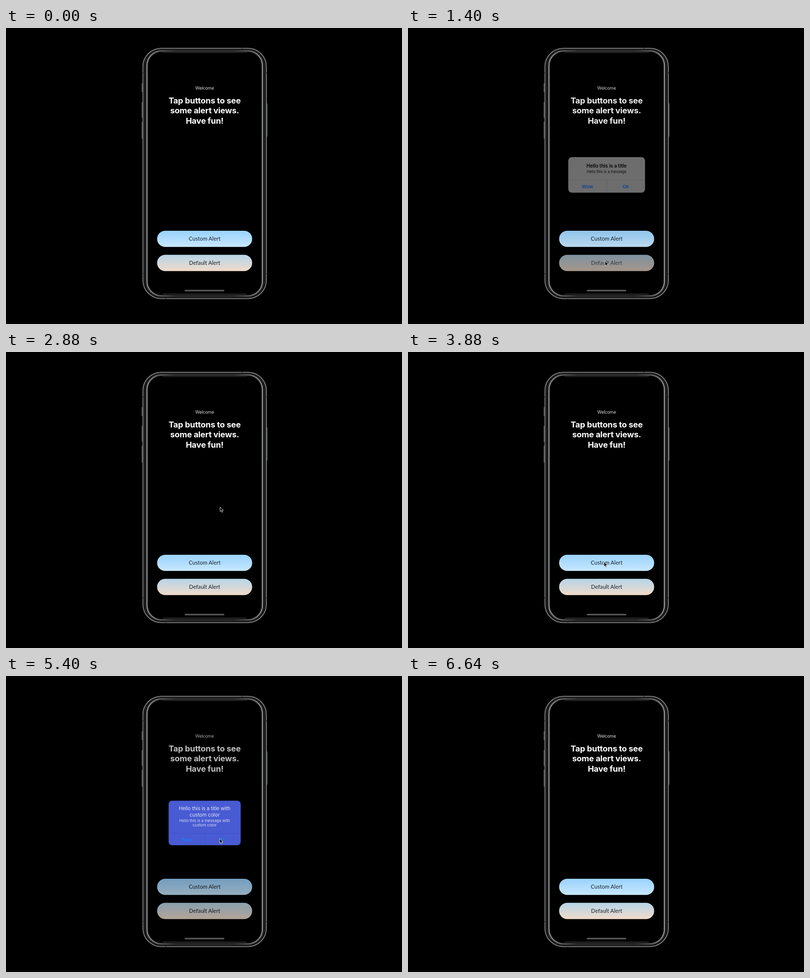
Animation of 800x600 px, one loop 6680 ms. Source, as an HTML page:

```html
<!DOCTYPE html>
<html lang="en">
<head>
<meta charset="utf-8">
<title>Alert views</title>
<style>
  html, body { margin: 0; width: 100%; height: 100%; overflow: hidden; background: #000; }
  svg { display: block; width: 800px; height: 600px; }
  text { text-anchor: middle; font-family: Inter, "Open Sans", sans-serif; }
  .heading { font-size: 16.6px; font-weight: 700; letter-spacing: -.2px; fill: #fff; }
  .label { font: 11px Lato, sans-serif; letter-spacing: .05px; fill: #17222b; }
  .action { font-size: 9px; font-weight: 600; fill: #1f7bf2; }
  .title { font-size: 9.2px; font-weight: 600; letter-spacing: -.08px; fill: #0c0c0c; }
  .message { font-size: 7px; letter-spacing: 0; fill: #151515; }
  .light { font-size: 10px; font-weight: 400; letter-spacing: -.05px; fill: #e4e6f6; }
  .small { font-size: 7.9px; letter-spacing: -.03px; fill: #d8dcf4; }
</style>
</head>
<body>
<svg viewBox="0 0 800 600">
  <defs>
    <linearGradient id="sky" x2="0" y2="1">
      <stop stop-color="#99d2fd"/><stop offset="1" stop-color="#c8e8ff"/>
    </linearGradient>
    <linearGradient id="dawn" x2="0" y2="1">
      <stop stop-color="#b7d5e8"/><stop offset=".5" stop-color="#d3d7d9"/><stop offset="1" stop-color="#f1dbc9"/>
    </linearGradient>
    <linearGradient id="rim">
      <stop stop-color="#a4a6a7"/><stop offset=".12" stop-color="#6a6a6a"/><stop offset=".25" stop-color="#2a2a2a"/>
      <stop offset=".75" stop-color="#2a2a2a"/><stop offset=".88" stop-color="#6a6a6a"/><stop offset="1" stop-color="#a4a6a7"/>
    </linearGradient>
    <linearGradient id="shine" x2="0" y2="1">
      <stop stop-color="#3c3c3c"/><stop offset="1" stop-color="#000"/>
    </linearGradient>
  </defs>

  <g id="phone" fill="none">
    <path d="M274.8 112V130M274.8 150V182M274.8 190V224M527.4 153V220" stroke="#5c5f60" stroke-width="1.6"/>
    <rect x="276.7" y="41.2" width="249.2" height="507.2" rx="37" fill="#0b0b0b" stroke="#77797a" stroke-width="2"/>
    <rect x="280.5" y="44.6" width="241.6" height="500.4" rx="34" stroke="#2c2d2d" stroke-width="1.6"/>
    <rect x="285" y="46.6" width="232.8" height="496.4" rx="30" fill="#000" stroke="#242424" stroke-width="4.4"/>
    <path d="M312 46.5H491L484 52H319Z" fill="url(#shine)"/>
    <path d="M319 538H484L491 542.4H312Z" fill="#1d1d1d"/>
    <rect x="284.6" y="46.4" width="233.6" height="496.8" rx="30" stroke="url(#rim)" stroke-width="1.8"/>
    <path d="M275.5 91H279M523.5 91H527M275.5 498H279M523.5 498H527M477 40V43M323 546.5V549.5" stroke="#2c2c2c" stroke-width="1.5"/>
  </g>

  <text x="401.3" y="125" font-size="8.8" letter-spacing="-.1" fill="#dcdcdc">Welcome</text>
  <text class="heading" x="401.3" y="152.6">Tap buttons to see</text>
  <text class="heading" x="401.3" y="173.2">some alert views.</text>
  <text class="heading" x="401.3" y="193.8">Have fun!</text>

  <g id="customButton">
    <rect x="305.3" y="410.9" width="192" height="32.9" rx="16.4" fill="url(#sky)"/>
    <text class="label" x="401.3" y="431">Custom Alert</text>
  </g>
  <g id="defaultButton">
    <rect x="305.3" y="459.8" width="192" height="32.9" rx="16.4" fill="url(#dawn)"/>
    <text class="label" x="401.3" y="480">Default Alert</text>
  </g>

  <rect id="dim" x="292" y="100" width="220" height="400"/>
  <rect x="361" y="530.8" width="80" height="3" rx="1.5" fill="#5b5b5b"/>

  <g id="defaultAlert">
    <rect x="328.5" y="264" width="145.6" height="67.6" rx="7" fill="#bdbdbd"/>
    <path d="M328.5 307.5H474M401.5 307.5V331.6" stroke="#a3a3a3" stroke-width=".7"/>
    <text class="title" x="401.2" y="283.6">Hello this is a title</text>
    <text class="message" x="401.2" y="294.5">Hello this is a message</text>
    <text class="action" x="365" y="323">Wow</text>
    <text class="action" x="437.5" y="323">Ok</text>
  </g>
  <g id="customAlert">
    <rect x="328.5" y="252.8" width="145.6" height="90.2" rx="7" fill="#485bd2"/>
    <path d="M328.5 319H474M401.5 319V343" stroke="#4050bd" stroke-width=".7"/>
    <text class="light" x="401.2" y="272.4">Hello this is a title with</text>
    <text class="light" x="401.2" y="285.4">custom color</text>
    <text class="small" x="401.2" y="296">Hello this is a message with</text>
    <text class="small" x="401.2" y="305.3">custom color</text>
    <text class="action" x="365" y="334.5">Wow</text>
    <text class="action" x="437.5" y="334.5">Ok</text>
  </g>

  <path id="cursor" d="M0 0V9.6L2.2 7.6L3.7 11L5.3 10.3L3.8 7H6.9Z" fill="#080808" stroke="#e8e8e8" stroke-width=".8" stroke-linejoin="round"/>
</svg>
<script>
  const LOOP = 6680, STEP = 40, DIM = 0.25;
  const part = id => document.getElementById(id);
  const clamp = v => Math.min(1, Math.max(0, v));
  const progress = (t, start, length) => clamp((t - start) / length);
  const smooth = p => p * p * (3 - 2 * p);
  const easeOut = (p, power) => 1 - (1 - p) ** power;

  const taps = [
    { button: 'defaultButton', alert: 'defaultAlert', down: 1000, up: 1200, show: 1260, hide: 2520, y: 297.8 },
    { button: 'customButton', alert: 'customAlert', down: 3920, up: 4040, show: 4060, hide: 5700, y: 297.9 }
  ];

  // Cursor stops: time, x, y
  const stops = [
    [400, 405, 523], [700, 398, 472.5], [1480, 398, 472.5], [1960, 432.5, 314],
    [2880, 432.5, 314], [3480, 396, 425.5], [4560, 396, 425.5], [5120, 431.5, 329.5],
    [6160, 431.5, 329.5], [6440, 490, 478]
  ];

  function drawCursor(t) {
    const next = stops.findIndex(s => s[0] > t);
    const cursor = part('cursor');
    cursor.style.display = next > 0 ? '' : 'none';
    if (next < 1) return;
    const [t0, x0, y0] = stops[next - 1], [t1, x1, y1] = stops[next];
    const p = smooth(progress(t, t0, t1 - t0));
    cursor.setAttribute('transform', `translate(${x0 + (x1 - x0) * p} ${y0 + (y1 - y0) * p})`);
  }

  // A pressed button fades as a whole, and its label fades within it
  function drawButton(t, { button, down, up }) {
    const opacity = t < down ? 1 : 0.2 + 0.8 * easeOut(progress(t, up, 470), 2);
    const group = part(button);
    group.setAttribute('opacity', opacity);
    group.querySelector('text').setAttribute('opacity', opacity);
  }

  function drawAlert(t, { alert, show, hide, y }) {
    const staying = 1 - smooth(progress(t, hide, 360));
    const scale = 1.2 - 0.2 * easeOut(progress(t, show, 450), 3);
    const group = part(alert);
    group.setAttribute('opacity', easeOut(progress(t, show, 400), 2) * staying);
    group.setAttribute('transform', `translate(401.3 ${y}) scale(${scale}) translate(-401.3 ${-y})`);
    return smooth(progress(t, show, 420)) * staying;
  }

  function draw(t) {
    taps.forEach(tap => drawButton(t, tap));
    const shade = Math.max(...taps.map(tap => drawAlert(t, tap)));
    part('dim').setAttribute('opacity', DIM * shade);
    drawCursor(t);
  }

  const begin = performance.now();
  function frame() {
    const t = (performance.now() - begin) % LOOP;
    draw(Math.floor(t / STEP) * STEP);
    requestAnimationFrame(frame);
  }
  frame();
</script>
</body>
</html>
```
